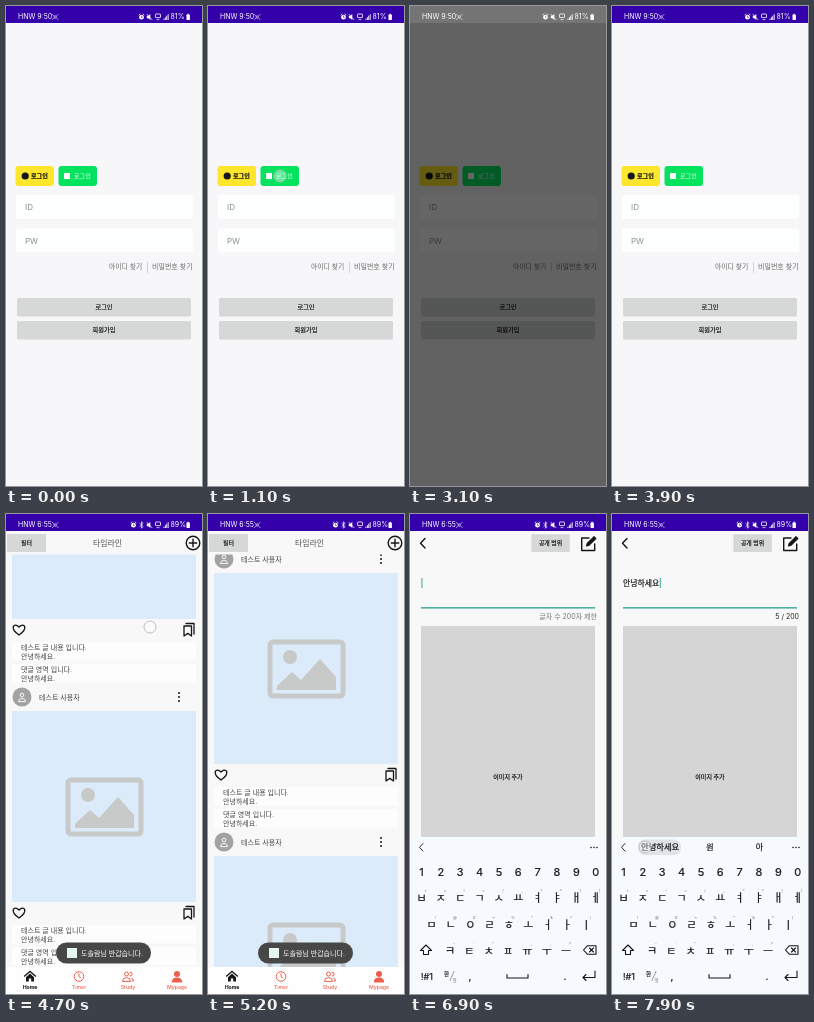
Animation, 196 px wide and 480 px high, one loop 8 s. Source, as an HTML page:

```html
<!DOCTYPE html>
<html lang="ko">
<head>
<meta charset="utf-8">
<style>
  html, body { margin: 0; width: 100%; height: 100%; overflow: hidden; background: #f7f7f9; }
  svg { display: block; width: 100%; height: 100%; }
  text { font-family: Inter, "Noto Sans CJK KR", "Noto Sans CJK", sans-serif; white-space: pre; }
</style>
</head>
<body>
<svg id="stage" viewBox="0 0 196 480"></svg>
<script>
const LOOP = 8000, STEP = 100;
const INK = '#161616', CORAL = '#ee5f4d', TEAL = '#25a08f', PURPLE = '#3300aa', KEY = '#d6d7d7';

// Drawing helpers; dark labels get a hairline stroke for a medium weight
const rect = (x, y, w, h, fill, r = 0, extra = '') =>
  `<rect x="${x}" y="${y}" width="${w}" height="${h}" rx="${r}" fill="${fill}" ${extra}/>`;
const circle = (x, y, r, fill, extra = '') => `<circle cx="${x}" cy="${y}" r="${r}" fill="${fill}" ${extra}/>`;
const line = (d, color = INK, width = 1, fill = 'none') =>
  `<path d="${d}" fill="${fill}" stroke="${color}" stroke-width="${width}" stroke-linejoin="round" stroke-linecap="round"/>`;
const shape = (d, fill) => `<path d="${d}" fill="${fill}"/>`;
const text = (s, x, y, size, fill = INK, anchor = 'start', weight = 400) =>
  `<text x="${x}" y="${y}" font-size="${size}" fill="${fill}" text-anchor="${anchor}" font-weight="${weight}"
    stroke="${fill === INK ? INK : 'none'}" stroke-width=".2">${s}</text>`;
const mid = (s, x, y, size, fill, weight) => text(s, x, y, size, fill, 'middle', weight);
const group = (id, body) => `<g id="${id}">${body}</g>`;
const button = (s, x, y, w, h, size, fill = KEY, color = INK) =>
  rect(x, y, w, h, fill, 1) + mid(s, x + w / 2, y + h / 2 + size * .36, size, color);
const plusCircle = (x, y, r, width) =>
  circle(x, y, r, 'none', `stroke="${INK}" stroke-width="${width}"`) +
  line(`M${x - r * .55} ${y}h${r * 1.1}M${x} ${y - r * .55}v${r * 1.1}`, INK, width);

function statusBar(time, percent, bg, color, bluetooth) {
  const left = bluetooth ? 127.5 : 135.5;
  let icons = circle(left, 11.2, 2.4, color) +
    line(`M${left - 2.5} 8.8l1-.8M${left + 2.5} 8.8l-1-.8`, color, .8) +
    line(`M${left} 10v1.4h1`, bg, .6);
  if (bluetooth) icons += line('M133.8 9.4l3.4 3.2-1.7 1.6v-6.4l1.7 1.6-3.4 3.2', color, .7);
  return rect(0, 0, 196, 17, bg) +
    text(`HNW ${time}`, 12, 13.4, 7, color) +
    line('M46.5 8.5l1 1M52 8.5l-1 1M46.5 13.5l1-1M52 13.5l-1-1', color, .7) +
    circle(49.2, 11, 1.2, 'none', `stroke="${color}" stroke-width=".7"`) + icons +
    shape('M140.8 9.7h1.5l2-1.7v6l-2-1.7h-1.5z', color) + line('M141 8.3l5 5.4', color, .7) +
    rect(149.5, 8, 5, 3.6, 'none', .5, `stroke="${color}" stroke-width=".8"`) + line('M151 13.6h2', color, .7) +
    [0, 1, 2, 3].map(i => rect(157.5 + i * 1.4, 12.7 - i * 1.5, .9, 1.3 + i * 1.5, color)).join('') +
    text(`${percent}%`, 164.5, 13.4, 7, color) +
    rect(180.5, 8.6, 3.4, 5.4, color, .6) + rect(181.4, 7.8, 1.6, 1, color);
}

function login() {
  const field = (s, y) => rect(10, y, 177, 24, '#fdfefe', 2) + text(s, 19, y + 15.2, 8, '#8c8c8c');
  return rect(0, 0, 196, 480, '#f7f7f9') + statusBar('9:50', 81, PURPLE, '#fff') +
    rect(9.5, 160, 38.5, 20, '#fde62c', 3) + circle(19.2, 170, 3.6, INK) +
    text('로그인', 25, 172.3, 6.1, INK, 'start', 700) +
    rect(52.5, 160, 38.5, 20, '#05e25d', 3) + rect(58, 167, 6, 6, '#fff') +
    text('로그인', 68, 172.3, 6.1, '#fff') +
    field('ID', 189) + field('PW', 222.5) +
    text('아이디 찾기', 103, 263, 6.8, '#6a6a6a') + line('M141.5 256.5v10', '#c4c4c4', .7) +
    text('비밀번호 찾기', 146, 263, 7, '#6a6a6a') +
    button('로그인', 11, 292, 174, 18.5, 6.2) + button('회원가입', 11, 315, 174, 18.5, 6.2);
}

const dimmer = () => rect(0, 0, 196, 480, '#000', 0, 'opacity=".6"') + statusBar('9:50', 81, '#747474', '#fff');

function accountPage() {
  const row = (name, y) => rect(10, y, 176, 26, '#fdfdfd', 0, 'stroke="#dcdcdc" stroke-width=".7"') +
    line(`M17.5 ${y + 13}l2 2.3 4-4.8`, '#333', 1) + text(name, 29, y + 15.5, 7.3) +
    circle(175, y + 13, 3.6, '#777') + line(`M173.7 ${y + 11.7}l2.6 2.6m0-2.6l-2.6 2.6`, '#fff', .8);
  return rect(0, 0, 196, 480, '#ebebed') + statusBar('9:50', 81, '#ebebed', '#444') +
    line('M18 28.5h-8m3.8-3.8l-3.8 3.8 3.8 3.8', INK, 1.1) +
    rect(90.5, 50, 15, 15, '#10cf5c') +
    text('모루빛 로그인으로 <tspan fill="#3bbf82">Plomy</tspan> 서비스를 이용하실 수 있습니다.', 10, 86.3, 6.3, '#222') +
    row('mossacorn', 91) + row('owtdev', 118) +
    text('+ 다른 아이디로 로그인', 10, 167, 7.5) +
    mid('© MORUV Corp.  |  회원정보 고객센터', 98, 472, 4.9, '#777');
}

function post(top) {
  const note = (first, y) => rect(6, top + y, 184, 18.5, '#fdfdfd') +
    text(first, 15, top + y + 8, 7, '#444') + text('안녕하세요.', 15, top + y + 17, 7, '#444');
  const y = top + 202;
  return circle(16, top - 14, 9.5, '#a2a2a2') +
    circle(16, top - 16, 1.8, 'none', 'stroke="#fff" stroke-width=".9"') +
    line(`M12.5 ${top - 9.8}q0-2.8 3.5-2.8t3.5 2.8z`, '#fff', .9) +
    text('테스트 사용자', 33, top - 11.2, 7, '#444') +
    [-18, -14, -10].map(d => circle(173, top + d, 1, INK)).join('') +
    rect(6, top, 184, 191, '#dcebfa') +
    rect(62, top + 69, 73, 54, 'none', 3, 'stroke="#c8c9c9" stroke-width="5"') +
    circle(82, top + 84, 7, '#c8c9c9') +
    shape(`M69 ${top + 117}v-4l15-14 9 8 19-21 16 18v13z`, '#c8c9c9') +
    line(`M13 ${y + 5}C3 ${y - 2} 8 ${y - 8} 13 ${y - 3}C18 ${y - 8} 23 ${y - 2} 13 ${y + 5}z`, INK, 1.4) +
    line(`M178 ${y - 4}h7.5v10l-3.7-2.6-3.8 2.6zM180 ${y - 6.5}h8v10.5`, INK, 1.3) +
    note('테스트 글 내용 입니다.', 214) + note('댓글 영역 입니다.', 236);
}

function tabBar() {
  const label = (s, x, color) => mid(s, x, 475.3, 5.2, color, 500);
  return rect(0, 453, 196, 27, '#fefefe') +
    shape('M24 456.5l6.3 5.6-.9 1L24 458.3l-5.4 4.8-.9-1zM20 463.2l4-3.6 4 3.6v4.3h-2.8v-3h-2.4v3H20z', INK) +
    circle(73, 462.5, 4.8, 'none', `stroke="${CORAL}"`) + line('M73 459.8v3l1.8 1', CORAL, .9) +
    circle(120.5, 460, 2, 'none', `stroke="${CORAL}"`) +
    line('M116.5 467q0-3.4 4-3.4t4 3.4zM124 458.2q2.2 0 2.2 1.9t-2.2 1.9M125.5 464q2 .6 2 3h-1.5', CORAL, 1) +
    circle(171, 460, 3, CORAL) + shape('M165.8 468.4q0-5 5.2-5t5.2 5z', CORAL) +
    label('Home', 24, INK) + label('Timer', 73, CORAL) + label('Study', 122, CORAL) + label('Mypage', 171, CORAL);
}

function timeline() {
  const posts = [0, 1, 2].map(i => post(64 + i * 283)).join('');
  return rect(0, 0, 196, 480, '#f8f8f8') + group('feed', posts) +
    rect(0, 17, 196, 23.5, '#f8f8f8') + statusBar('6:55', 89, PURPLE, '#fff', true) +
    button('필터', 1, 20, 39, 18, 6) + text('타임라인', 87, 32, 7.9, '#555') + plusCircle(187, 29, 6.8, 1.4) +
    tabBar() +
    group('toast', rect(50, 428.5, 95, 21, '#474747', 10.5) + rect(61, 434, 10, 10, '#e4f5ee') +
      text('도솔람님 반갑습니다.', 75, 441.7, 7, '#fff'));
}

function keyboard() {
  const escape = s => s.replace('&', '&amp;').replace('<', '&lt;');
  const row = (keys, x, y, hints = '') => [...keys].map((key, i) =>
    mid(key, x + i * 19.35, y, 11) +
    mid(escape(hints[i] || ''), x + i * 19.35 + 4, y - 10.5, 4, '#777')).join('');
  return rect(0, 323, 196, 157, '#f6f9fe') +
    line('M13 329.5l-3.5 3.8 3.5 3.8', INK, .9) +
    rect(26, 325.5, 43, 15.5, '#dfe2e6', 7, 'id="pressed"') +
    group('suggestions', text('안녕하세요', 29, 336.3, 8.3) + mid('원', 98, 336.3, 8) + mid('아', 147.5, 336.3, 8)) +
    [181, 184, 187].map(x => circle(x, 333.5, .8, INK)).join('') +
    row('1234567890', 11.5, 361.5) +
    row('ㅂㅈㄷㄱㅅㅛㅕㅑㅐㅔ', 11.5, 388, '+×÷=/_<>[]') +
    row('ㅁㄴㅇㄹㅎㅗㅓㅏㅣ', 21.5, 415, '!@#~%^&*(') +
    row('ㅋㅌㅊㅍㅠㅜㅡ', 40, 441, '-\'":;,?') +
    line('M16 431l5.5 5.5h-3v4h-5v-4h-3z', INK, 1.1) +
    line('M173.5 436l4-4.3h8.5v8.6h-8.5zM179.5 434l4 4m0-4l-4 4', INK, 1.1) +
    mid('!#1', 17, 466, 9) + text('한', 34, 462, 5.5) + line('M40 466.5l4-9', '#555', .6) + text('영', 42.5, 468, 4.5, '#777') +
    mid(',', 60, 466, 10) + line('M97 460.5v3.5h21v-3.5', INK, 1.1) + mid('.', 155, 466, 10) +
    line('M185 457v6.5h-12m3-3l-3 3 3 3', INK, 1.1);
}

function editor() {
  return rect(0, 0, 196, 480, '#f8f8f8') + statusBar('6:55', 89, PURPLE, '#fff', true) +
    line('M15 24.5l-4.5 4.8 4.5 4.8', INK, 1.4) + button('공개 범위', 121.3, 20.3, 38.5, 17.7, 5.9) +
    line('M179 24h-7.3v12.5h13v-6.5', INK, 1.4) + line('M176.5 32l.7-2.5 6.8-6.8 1.8 1.8-6.8 6.8z', INK, 1.1, INK) +
    `<text id="entry" x="11" y="72.3" font-size="7.9" fill="${INK}" stroke="${INK}" stroke-width=".2"></text>` +
    rect(0, 64, .9, 10, TEAL, 0, 'id="caret"') +
    rect(11, 93.2, 174, .9, '#8a8a8a', 0, 'id="underline"') +
    '<text id="counter" x="187" y="105" font-size="7" text-anchor="end"></text>' +
    rect(11, 112, 174, 304, '#d5d5d5') + mid('이미지 추가', 98, 265.2, 6) +
    button('직업', 11.5, 423, 38, 17, 7, '#d5d5d5', '#999') + plusCircle(57.3, 431.7, 4.6, 1) +
    tabBar() + group('keyboard', keyboard());
}

stage.innerHTML = group('loginView', login()) + group('dimView', dimmer()) +
  group('accountView', accountPage()) + group('timelineView', timeline()) + group('editorView', editor()) +
  circle(0, 0, 6, '#fff', 'id="touch" fill-opacity=".35" stroke="#bbb" stroke-width=".9"');

const $ = id => document.getElementById(id);
const ramp = (t, from, to) => Math.min(1, Math.max(0, (t - from) / (to - from)));
const show = (id, opacity) => {
  $(id).setAttribute('opacity', opacity);
  $(id).style.display = opacity > 0 ? '' : 'none';
};
const within = (t, from, to) => +(t >= from && t < to);
const pulse = (t, from, to) => ramp(t, from - 100, from) * (1 - ramp(t, to, to + 200));

// Drag with the finger, then a decelerating fling
const scroll = t => 150 * ramp(t, 4400, 4700) ** 1.5 + 138 * (1 - (1 - ramp(t, 4700, 5200)) ** 2);

// Start, end, x, y of each tap
const DRAG = [4400, 4700, 144, 263];
const taps = [[1100, 1200, 72, 170], [2400, 2500, 60, 104], DRAG,
  [5700, 5900, 188, 32], [6200, 6300, 60, 70], [7100, 7150, 60, 411], [7300, 7350, 157, 411],
  [7500, 7550, 41, 411], [7800, 7900, 33, 333]];
const typed = [[7800, '안녕하세요'], [7500, '안'], [7300, '아'], [7100, 'ㅇ'], [0, '']];

function draw(t) {
  show('loginView', within(t, 0, 4100));
  show('dimView', ramp(t, 1200, 1500) * (1 - ramp(t, 3100, 3500)));
  show('accountView', ramp(t, 1400, 1700) * (1 - ramp(t, 2700, 3000)));
  show('timelineView', within(t, 4100, 5800));
  show('editorView', within(t, 5800, LOOP));
  show('toast', ramp(t, 4100, 4400) * (1 - ramp(t, 5500, 5800)));
  $('feed').setAttribute('transform', `translate(0 ${-scroll(t)})`);

  const focused = t >= 6300;
  const entry = typed.find(([start]) => t >= start)[1];
  $('entry').textContent = entry;
  $('caret').setAttribute('x', 11.5 + $('entry').getComputedTextLength());
  show('caret', +focused);
  $('underline').setAttribute('fill', focused ? TEAL : '#8a8a8a');
  $('underline').setAttribute('height', focused ? 1.3 : .9);
  $('counter').textContent = entry ? `${entry.length} / 200` : '글자 수 200자 제한';
  $('counter').setAttribute('fill', entry ? '#222' : '#777');
  show('keyboard', +(t > 6300));
  $('keyboard').setAttribute('transform', `translate(0 ${157 * (1 - ramp(t, 6300, 6600)) ** 2})`);
  show('suggestions', +(t >= 7500));
  show('pressed', pulse(t, 7800, 7900));

  const tap = taps.find(([from, to]) => pulse(t, from, to) > 0);
  show('touch', tap ? pulse(t, tap[0], tap[1]) : 0);
  if (!tap) return;
  $('touch').setAttribute('cx', tap[2]);
  $('touch').setAttribute('cy', tap[3] - (tap === DRAG ? scroll(Math.min(t, 4700)) : 0));
}

function tick() {
  draw(Math.floor(performance.now() % LOOP / STEP) * STEP);
  requestAnimationFrame(tick);
}
tick();
</script>
</body>
</html>
```
